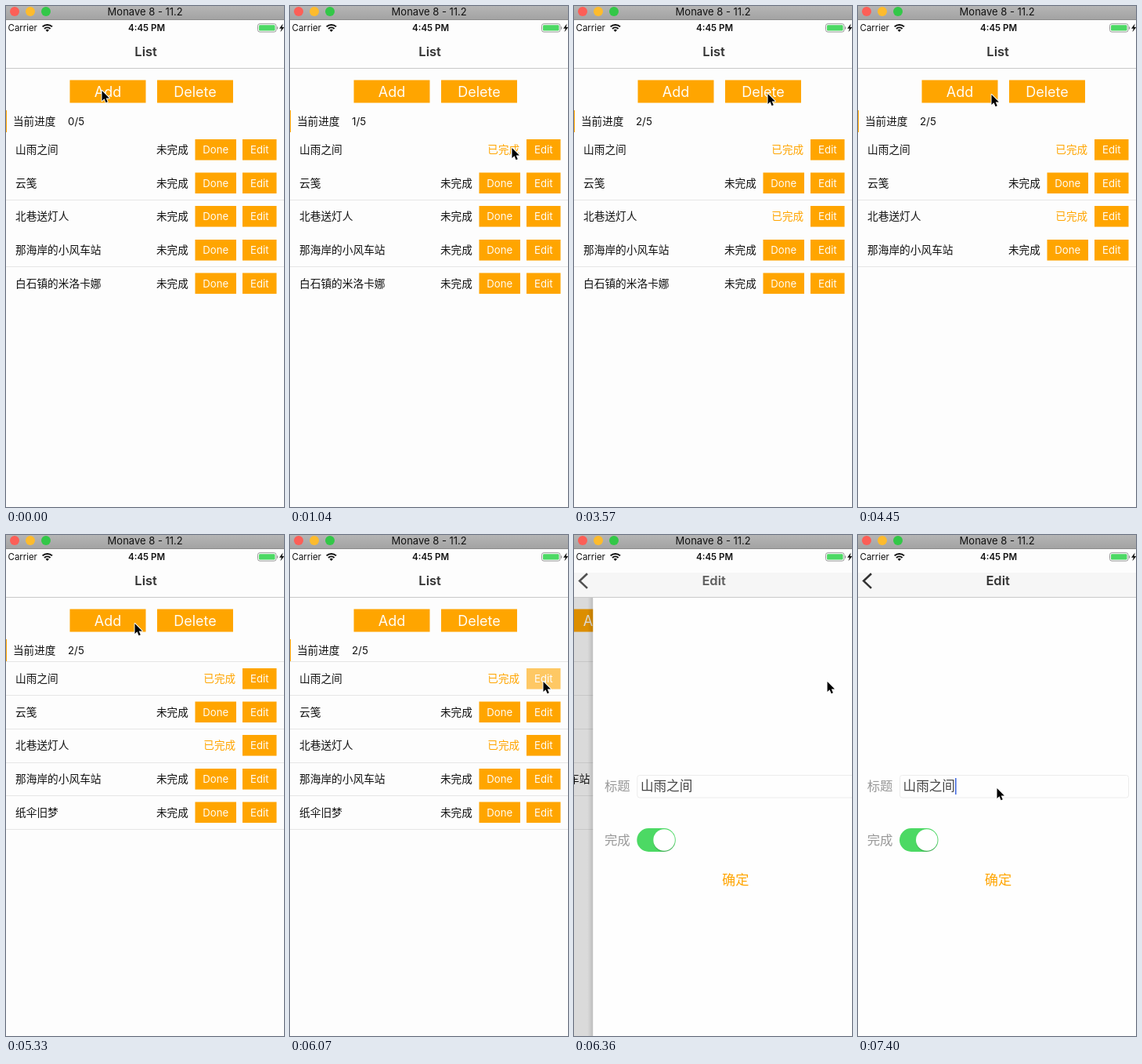
An HTML page for the animation above (8 s loop, 355x639 px).

```html
<!DOCTYPE html>
<html lang="zh-CN">
<head>
<meta charset="utf-8">
<title>List</title>
<style>
  html, body { margin: 0; width: 100%; height: 100%; overflow: hidden; background: #fdfdfd; }
  svg { display: block; width: 100%; height: 100%; }
  text { font-family: Inter, "Noto Sans CJK SC", "Noto Sans CJK", sans-serif; white-space: pre; }
</style>
</head>
<body>
<svg id="stage" viewBox="0 0 355 639" preserveAspectRatio="none"></svg>
<script>
const LOOP = 8000;
const TICK = 147.9;
const ORANGE = '#ffa500';
const SCREEN = 364;   // device width, starting 3px left of the stage
const ROW_H = 42.6;

const FIRST_DONE = 1030, THIRD_DONE = 2360;
const DELETE_PRESS = 3840, ADD_PRESS = 4880, EDIT_PRESS = 6060;
const FULL_RULES = 5320, PUSH = 6168, CARET = 7390;

const HOME = { x: 122, y: 107 };
const MOVES = [
  { from: 0, to: 740, x: 283, y: 180 },       // first Done
  { from: 1335, to: 2070, x: 272, y: 273 },   // third Done
  { from: 2815, to: 3545, x: 247, y: 111 },   // Delete
  { from: 4145, to: 4585, x: 144, y: 112 },   // Add
  { from: 5180, to: 5320, x: 164, y: 112 },
  { from: 5320, to: 5910, x: 323, y: 186 },   // first Edit
  { from: 6510, to: 7095, x: 177, y: 322 }    // title field
];

const TITLES = ['山雨之间', '云笺', '北巷送灯人', '那海岸的小风车站', '白石镇的米洛卡娜'];
const NEW_TITLE = '纸伞旧梦';

const text = (x, y, size, str, fill = '#111', more = '') =>
  `<text x="${x}" y="${y}" font-size="${size}" fill="${fill}" ${more}>${str}</text>`;
const mid = (x, y, size, str, fill, more = '') =>
  text(x, y, size, str, fill, `text-anchor="middle" ${more}`);
const rect = (x, y, w, h, fill, more = '') =>
  `<rect x="${x}" y="${y}" width="${w}" height="${h}" fill="${fill}" ${more}/>`;
const circle = (x, y, r, fill, more = '') =>
  `<circle cx="${x}" cy="${y}" r="${r}" fill="${fill}" ${more}/>`;
const group = (id, body) => `<g id="${id}">${body}</g>`;
const button = (id, x, y, w, h, size, label) => group(id,
  rect(x, y, w, h, ORANGE) + mid(x + w / 2, y + h / 2 + size * .365, size, label, '#fffdf5'));

function row(title, i) {
  const top = 170 + Math.round(i * ROW_H * 2) / 2;
  const base = top + 18.4;
  return group('row' + i,
    text(12, base, 13.7, title, '#111', `id="title${i}"`) +
    group('todo' + i, text(192, base, 13.6, '未完成') + button('done' + i, 241.5, top, 52.5, 26.6, 13.2, 'Done')) +
    group('finished' + i, text(252.3, base, 13.6, '已完成', ORANGE)) +
    button('edit' + i, 302, top, 43.5, 26.6, 13.2, 'Edit'));
}

const rule = i => rect(-3, Math.round(161.4 + 42.75 * i), SCREEN, 1, '#e6e6e6');

const listPage =
  rect(-3, 80, SCREEN, 559, '#fdfdfd') +
  button('add', 81.5, 94.5, 97, 29, 18, 'Add') +
  button('delete', 193, 94.5, 97, 29, 18, 'Delete') +
  rect(-3, 133, 4, 28, ORANGE) +
  text(9, 152.4, 13.6, '当前进度') +
  text(79, 152.4, 13.3, '0/5', '#111', 'id="progress"') +
  [2, 4].map(rule).join('') +
  group('rules', [0, 1, 3, 5].map(rule).join('')) +
  TITLES.map(row).join('');

const editPage =
  rect(-10, 80, 7, 559, 'url(#edge)') +
  rect(-3, 80, SCREEN, 559, '#fefefe') +
  text(11.7, 326.4, 16.4, '标题', '#999') +
  rect(53.5, 306.5, 292, 28.5, '#fefefe', 'rx="3" stroke="#ececec"') +
  text(57.6, 326.4, 16.6, TITLES[0], '#444') +
  rect(124, 310, 1.6, 21, '#4a6fe0', 'id="caret"') +
  text(11.7, 394.8, 16.4, '完成', '#999') +
  rect(53, 374, 49.5, 30, '#4cd964', 'rx="15"') +
  circle(87.8, 390.5, 13.8, '#000', 'opacity=".15"') +
  circle(87.8, 389, 13.8, '#fff') +
  mid(179, 446.3, 17.2, '确定', ORANGE);

const statusBar =
  rect(0, 18, 355, 30, '#fdfdfd') +
  text(2.6, 32, 11.4, 'Carrier') +
  `<g fill="none" stroke="#111" stroke-width="2">
     <path d="M46.6 26.4a9 9 0 0 1 12.4 0M49 29a5.6 5.6 0 0 1 7.6 0"/>
   </g><path d="M50.6 30.8a3.2 3.2 0 0 1 4.4 0l-2.2 2.3z" fill="#111"/>` +
  mid(179.6, 32, 11.5, '4:45 PM', '#111', 'font-weight="600"') +
  rect(321.5, 22.7, 23.5, 10.4, 'none', 'rx="2.6" stroke="#999"') +
  rect(323, 24.2, 20.5, 7.4, '#4cd964', 'rx="1.3"') +
  '<path d="M346 26v4q1.4-.6 1.4-2t-1.4-2z" fill="#999"/>' +
  '<path d="M353.6 22.5l-4.6 6.2h2.8l-1.4 4.6 5-6.4h-2.8z" fill="#111"/>';

const windowBar =
  rect(0, 0, 355, 17, 'url(#bar)') + rect(0, 17, 355, 1, '#8c8c8c') +
  ['#fc5f57', '#fdbb2d', '#33c748'].map((c, i) => circle(11 + 20 * i, 7, 6, c)).join('') +
  mid(177.7, 11.9, 13, 'Monave 8 - 11.2', '#111');

const navBar =
  rect(0, 48, 355, 31, '#f6f6f6', 'id="navBack"') +
  rect(0, 79, 355, 1, '#c9c9c9') +
  mid(178.6, 64.2, 16.5, 'List', '#333', 'id="listName" font-weight="600"') +
  mid(178.6, 64.2, 16.5, 'Edit', '#333', 'id="editName" font-weight="600"') +
  '<path id="back" d="M17 49.3L7.2 58.6l9.8 9.3" fill="none" stroke="#333" stroke-width="2.6"/>';

const pointer =
  '<path d="M.5 1v13l3-2.8 2.1 5 2.2-.9-2.1-4.8h4.2z" fill="#000" stroke="#fff" stroke-width="1.8" paint-order="stroke" stroke-linejoin="round"/>';

const gradient = (id, dir, stops) =>
  `<linearGradient id="${id}" x1="0" y1="0" ${dir}>${stops}</linearGradient>`;

document.getElementById('stage').innerHTML =
  '<defs>' +
  gradient('bar', 'x2="0" y2="1"', '<stop stop-color="#b5b5b5"/><stop offset="1" stop-color="#a3a3a3"/>') +
  gradient('edge', 'x2="1" y2="0"', '<stop stop-color="#000" stop-opacity="0"/><stop offset="1" stop-color="#000" stop-opacity=".13"/>') +
  '</defs>' +
  rect(0, 0, 355, 639, '#fdfdfd') +
  group('list', listPage) +
  rect(0, 80, 355, 559, '#000', 'id="dim"') +
  group('editor', editPage) +
  navBar + statusBar + windowBar +
  group('pointer', pointer);

const $ = id => document.getElementById(id);
const show = (id, on) => $(id).setAttribute('display', on ? 'inline' : 'none');
const fade = (id, v) => $(id).setAttribute('opacity', v);
const move = (id, x, y = 0) => $(id).setAttribute('transform', `translate(${x} ${y})`);
const write = (id, str) => { if ($(id).textContent !== str) $(id).textContent = str; };
const clamp = v => Math.min(1, Math.max(0, v));
const ease = u => (1 - Math.cos(Math.PI * u)) / 2;

function pointerAt(t) {
  return MOVES.reduce((p, m) => {
    const u = ease(clamp((t - m.from) / (m.to - m.from)));
    return { x: p.x + (m.x - p.x) * u, y: p.y + (m.y - p.y) * u };
  }, HOME);
}

// A pressed button is dim for one step
const press = (id, t, start) => fade(id, t >= start && t < start + TICK ? .6 : 1);

function draw(t) {
  const { x, y } = pointerAt(t);
  move('pointer', Math.round(x), Math.round(y));

  // List contents
  const first = t >= FIRST_DONE, third = t >= THIRD_DONE;
  write('progress', `${first + third}/5`);
  TITLES.forEach((_, i) => {
    const done = (i === 0 && first) || (i === 2 && third);
    show('todo' + i, !done);
    show('finished' + i, done);
  });
  const removed = t >= DELETE_PRESS + TICK, added = t >= ADD_PRESS + TICK;
  show('row4', !removed || added);
  write('title4', added ? NEW_TITLE : TITLES[4]);
  show('rules', t >= FULL_RULES);

  press('delete', t, DELETE_PRESS);
  press('add', t, ADD_PRESS);
  press('edit0', t, EDIT_PRESS);

  // Page push settles exponentially
  const p = 1 - Math.exp(-Math.max(0, t - PUSH) / 74);
  move('list', -.3 * SCREEN * p);
  move('editor', SCREEN * (1 - p));
  fade('dim', .15 * p);
  fade('listName', 1 - p);
  fade('editName', p ** 3.5);
  fade('back', p ** 2);
  show('editor', p > 0);
  show('navBack', p > 0);
  show('caret', t >= CARET);
}

const start = performance.now();
function tick() {
  const t = (performance.now() - start) % LOOP;
  draw(Math.floor(t / TICK) * TICK);
  requestAnimationFrame(tick);
}
tick();
</script>
</body>
</html>
```
